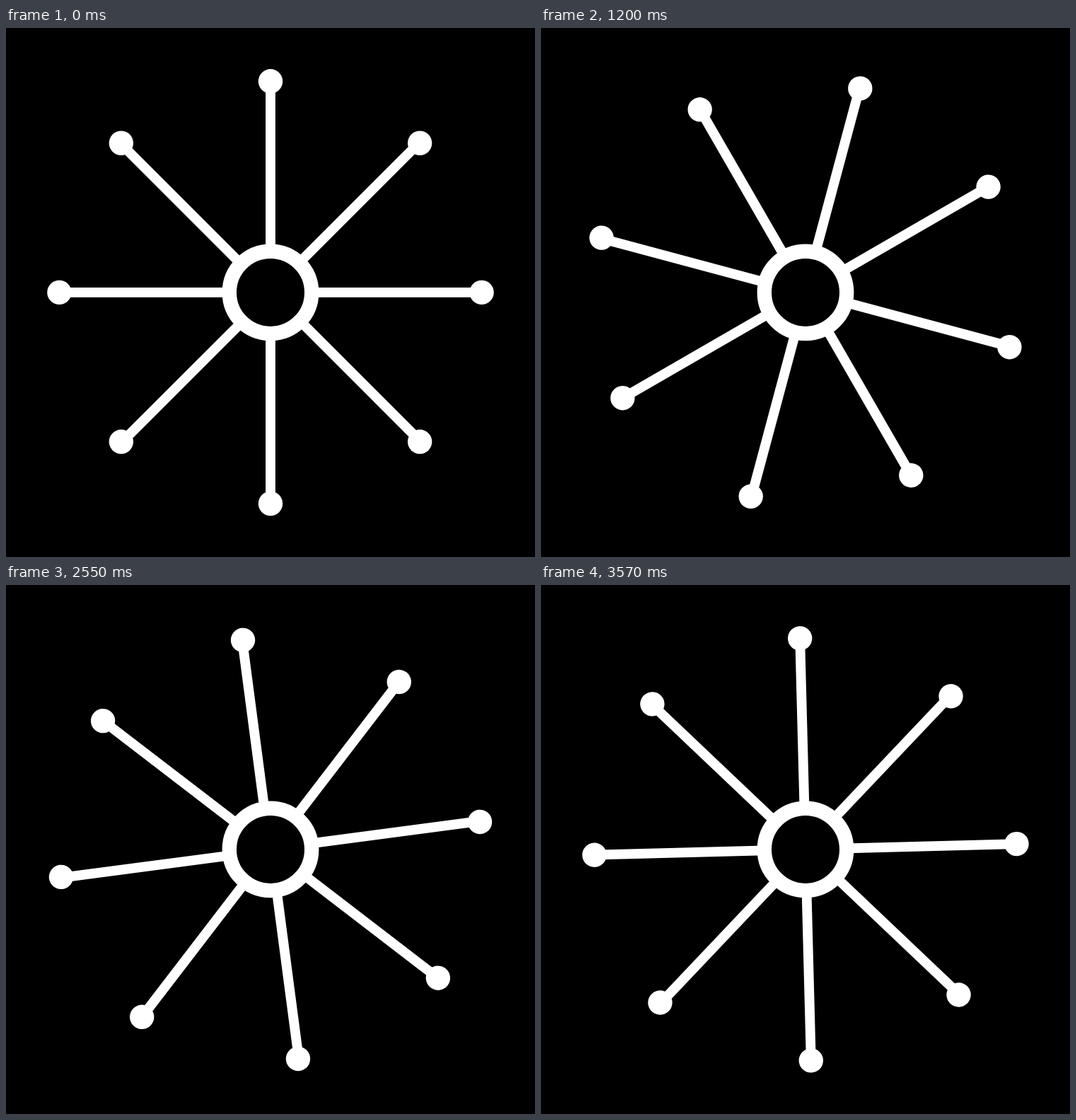
These frames come from a looping animation (748 by 748 pixels, 3.6 s). An HTML page with a canvas:

```html
<!DOCTYPE html>
<html lang="en">
<head>
<meta charset="utf-8">
<title>Turning spokes</title>
<style>
  html, body { margin: 0; width: 100%; height: 100%; overflow: hidden; background: #000; }
  canvas { display: block; }
</style>
</head>
<body>
<canvas id="stage" width="748" height="748"></canvas>
<script>
const ctx = document.getElementById('stage').getContext('2d');
const SIZE = 748, LOOP = 3600, STEP = 30;
const CENTER = { x: 374, y: 373.9 };
const SPOKES = 8, REACH = 298.6, DOT = 17.2, SPOKE_WIDTH = 13.8;
const DIAGONAL_SHIFT = -1; // diagonal bars sit slightly beside their axis
const RING = 58.2, RING_WIDTH = 20.4;

function drawCircle(x, radius, paint) {
  ctx.beginPath();
  ctx.arc(x, 0, radius, 0, Math.PI * 2);
  ctx[paint]();
}

function drawSpoke(angle, shift) {
  ctx.save();
  ctx.rotate(angle);
  ctx.fillRect(RING, shift - SPOKE_WIDTH / 2, REACH - RING, SPOKE_WIDTH);
  drawCircle(REACH, DOT, 'fill');
  ctx.restore();
}

function draw(time) {
  // Half a turn per loop, advancing in discrete steps.
  const stepped = Math.floor((time % LOOP) / STEP) * STEP;
  const turn = Math.PI * stepped / LOOP;

  ctx.setTransform(1, 0, 0, 1, 0, 0);
  ctx.fillStyle = '#000';
  ctx.fillRect(0, 0, SIZE, SIZE);
  ctx.translate(CENTER.x, CENTER.y);
  ctx.fillStyle = ctx.strokeStyle = '#fff';

  for (let i = 0; i < SPOKES; i++) {
    drawSpoke(turn + i * Math.PI * 2 / SPOKES, i % 2 * DIAGONAL_SHIFT);
  }

  ctx.lineWidth = RING_WIDTH;
  drawCircle(0, RING, 'stroke');
}

let start;
function tick(now) {
  start ??= now;
  draw(Math.max(0, now - start));
  requestAnimationFrame(tick);
}
draw(0);
requestAnimationFrame(tick);
</script>
</body>
</html>
```
